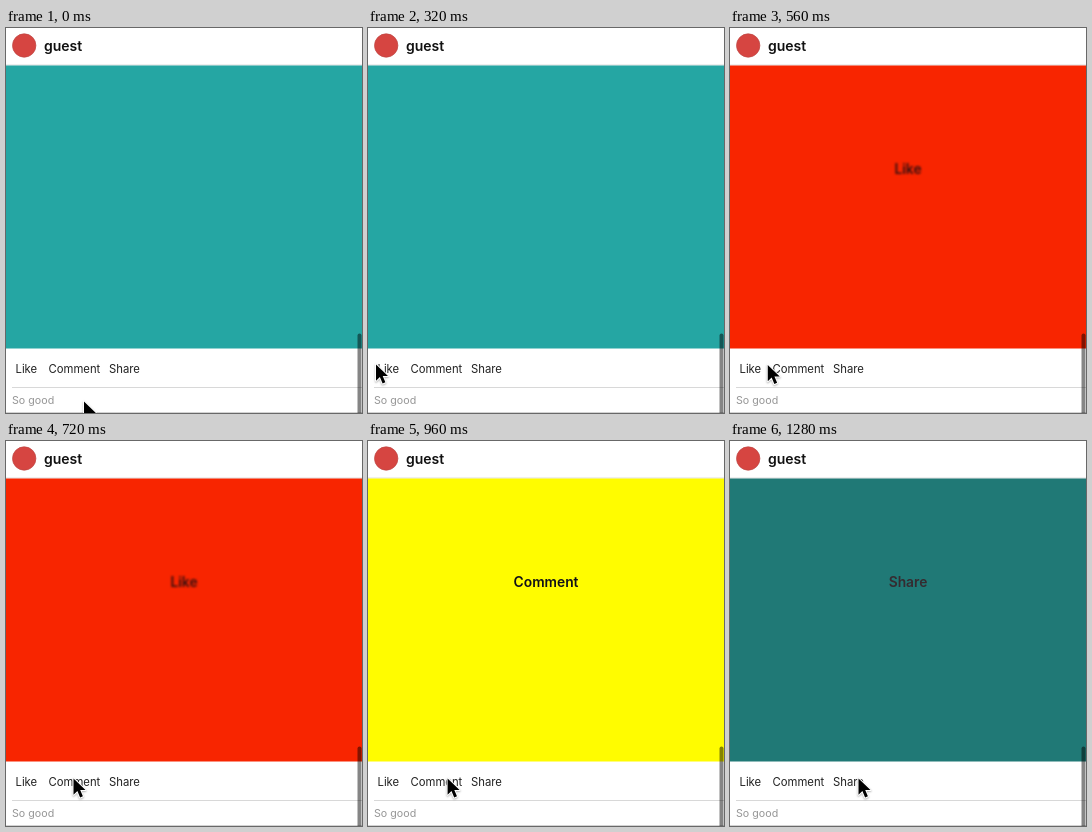
An HTML page with a canvas that plays this animation: 356x385 px, repeating every 1.36 s.

```html
<!DOCTYPE html>
<html lang="en">
<head>
<meta charset="utf-8">
<title>Post actions</title>
<style>
  html, body { margin: 0; width: 100%; height: 100%; overflow: hidden; background: #fff; }
  canvas { display: block; }
</style>
</head>
<body>
<canvas id="stage" width="356" height="385"></canvas>
<script>
const ctx = document.getElementById('stage').getContext('2d');
const LOOP = 1360, STEP = 80;
const FONT = 'Inter, "Liberation Sans", sans-serif';

// What the post shows from each moment on.
const scenes = [
  { at: 0, fill: '#25a6a3', label: '' },
  { at: 400, fill: '#f82500', label: 'Like', ink: '#351010', blur: 0.8 },
  { at: 800, fill: '#fffc00', label: 'Comment', ink: '#101018', blur: 0 },
  { at: 1280, fill: '#207976', label: 'Share', ink: '#352b30', blur: 0.5 }
];

// Pointer moves: start and end time, then the two end points.
const moves = [
  { t0: 0, t1: 280, from: [78, 373.5], to: [8, 336.5] },
  { t0: 440, t1: 680, from: [8, 336.5], to: [67.5, 337.5] },
  { t0: 880, t1: 1160, from: [67.5, 337.5], to: [128.5, 337.5] }
];

const ease = p => p * p * (3 - 2 * p);
const lastStarted = (list, key, t) => list.filter(item => item[key] <= t).pop();

function rect(x, y, w, h, fill) {
  ctx.fillStyle = fill;
  ctx.fillRect(x, y, w, h);
}

function text(str, x, y, size, weight, fill, align = 'left') {
  ctx.font = `${weight} ${size}px ${FONT}`;
  ctx.textAlign = align;
  ctx.fillStyle = fill;
  ctx.fillText(str, x, y);
}

function drawHeader() {
  ctx.beginPath();
  ctx.arc(18.2, 17.5, 11.7, 0, Math.PI * 2);
  ctx.fillStyle = '#d64541';
  ctx.fill();
  ctx.strokeStyle = '#bd4542';
  ctx.lineWidth = 0.7;
  ctx.stroke();
  text('guest', 38, 23, 14, 600, '#111');
}

function drawMedia({ fill, label, ink, blur }) {
  rect(0, 36.5, 356, 1, '#dedede');
  rect(0, 37.5, 356, 283, fill);
  if (!label) return;
  ctx.filter = blur ? `blur(${blur}px)` : 'none';
  text(label, 178, 146, 13.8, 600, ink, 'center');
  ctx.filter = 'none';
}

function drawFooter() {
  text('Like', 9.5, 344.5, 11.3, 400, '#222');
  text('Comment', 42.5, 344.5, 11.3, 400, '#222');
  text('Share', 103, 344.5, 11.3, 400, '#222');
  rect(6, 359, 350, 1, '#d8d8d8');
  text('So good', 6, 376, 10.7, 400, '#969696');
  rect(0, 384, 356, 1, '#d2d2d2');
}

function drawScrollbar() {
  ctx.beginPath();
  ctx.roundRect(351.5, 305.5, 4, 84, 2);
  ctx.fillStyle = 'rgba(0, 0, 0, 0.48)';
  ctx.fill();
}

function drawPointer(t) {
  const { t0, t1, from, to } = lastStarted(moves, 't0', t);
  const p = ease(Math.min(1, (t - t0) / (t1 - t0)));
  const [x, y] = from.map((v, i) => v + (to[i] - v) * p);
  const arrow = new Path2D('M0 0V16.2L3.9 12.6 6.6 19 9.4 17.8 6.7 11.6H12Z');
  ctx.save();
  ctx.translate(x, y);
  ctx.lineJoin = 'round';
  ctx.lineWidth = 2;
  ctx.strokeStyle = '#fff';
  ctx.shadowColor = 'rgba(0, 0, 0, 0.3)';
  ctx.shadowBlur = 2;
  ctx.shadowOffsetY = 1;
  ctx.stroke(arrow);
  ctx.shadowColor = 'transparent';
  ctx.fillStyle = '#000';
  ctx.fill(arrow);
  ctx.restore();
}

function draw(now) {
  const t = Math.floor((now % LOOP) / STEP) * STEP;
  rect(0, 0, 356, 385, '#fff');
  drawHeader();
  drawMedia(lastStarted(scenes, 'at', t));
  drawFooter();
  drawScrollbar();
  drawPointer(t);
}

const start = performance.now();
function loop() {
  draw(performance.now() - start);
  requestAnimationFrame(loop);
}
loop();
</script>
</body>
</html>
```
